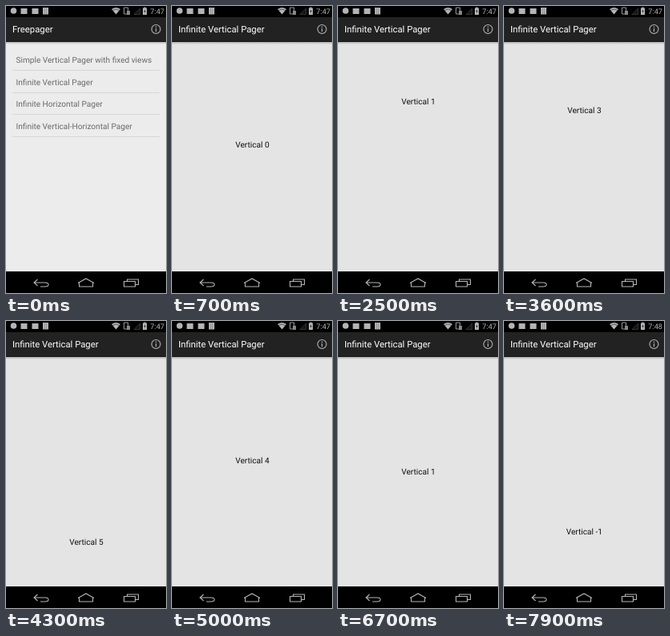
Recreate the animation shown at these times as an HTML page. Size 200x359 px, loop 8000 ms.

```html
<!DOCTYPE html>
<html lang="en">
<head>
<meta charset="utf-8">
<title>Vertical pager</title>
<style>
  html, body { margin: 0; width: 100%; height: 100%; overflow: hidden; background: #000; }
  svg { display: block; width: 100%; height: 100%; font-family: Roboto, sans-serif; text-rendering: geometricPrecision; }
  .title { font-size: 11.3px; fill: #fff; }
  .rows { font-size: 10.1px; fill: #6a6a6a; }
  .page { font-size: 10.1px; fill: #111; text-anchor: middle; }
  .line { fill: none; stroke: #b4b4b4; stroke-width: 1.1; }
</style>
</head>
<body>
<svg viewBox="0 0 200 359">
  <defs>
    <clipPath id="content"><rect y="45" width="200" height="287"/></clipPath>
    <linearGradient id="shadow" x2="0" y2="1">
      <stop stop-color="#000" stop-opacity=".24"/>
      <stop offset="1" stop-color="#000" stop-opacity="0"/>
    </linearGradient>
  </defs>
  <rect width="200" height="359"/>
  <rect y="14" width="200" height="31" fill="#222"/>

  <!-- Status bar -->
  <g fill="#b4b4b4">
    <circle cx="9.5" cy="6" r="3.8"/>
    <rect x="18.5" y="3" width="8" height="7"/>
    <rect x="32.5" y="3" width="8" height="7"/>
    <rect x="46" y="2" width="7" height="8.5"/>
    <path d="M48.300 2V10.500M50.700 2V10.500" stroke="#777" stroke-width=".5"/>
    <path d="M132 4Q137.500 0 143 4L137.500 10.500Z"/>
    <path d="M133 5.500Q137.500 2.500 142 5.500" fill="none" stroke="#333" stroke-width=".7"/>
    <path d="M147.500 2H152.500V10H147.500Z" fill="none" stroke="#999"/>
    <path d="M151 6H155V11H151Z" fill="#888"/>
    <path d="M160 10.500L167.500 3V10.500Z" fill="#151515" stroke="#444" stroke-width=".7"/>
    <path d="M171 2.500H172.500V1.500H174.500V2.500H176V11H171Z"/>
    <path d="M174 4L172.300 7H173.500L173 9.500L174.800 6H173.600Z" fill="#222"/>
    <text id="clock" x="198" y="9.700" font-size="9.2" text-anchor="end"></text>
  </g>

  <!-- List screen -->
  <rect y="45" width="200" height="287" fill="#ececec"/>
  <g id="list">
    <rect id="pressed" x="8" y="81" width="184" height="27" fill="#cacaca"/>
    <g class="rows" id="rows"></g>
    <text class="title" x="8" y="33">Freepager</text>
  </g>

  <!-- Pager screen -->
  <g id="pager">
    <rect y="45" width="200" height="287" fill="#e4e4e4"/>
    <text class="title" x="8" y="33">Infinite Vertical Pager</text>
    <g class="page" clip-path="url(#content)">
      <text id="upper" x="100.400"></text>
      <text id="lower" x="100.400"></text>
    </g>
  </g>

  <rect y="44" width="200" height="1" fill="#161616"/>
  <rect y="45" width="200" height="3" fill="url(#shadow)"/>
  <circle class="line" cx="187.500" cy="29" r="5.500"/>
  <path d="M187.500 25.500V27M187.500 28V32.200" class="line" stroke-width="1.300"/>

  <!-- Navigation bar -->
  <g class="line">
    <path d="M39.500 342L35 346L39.500 350M35 346H49Q53 346 53 348.500Q53 351 49 351H43"/>
    <path d="M90 346.500L100 341L110 346.500M91.500 346V351H108.500V346"/>
    <path d="M147.500 344.500H161.500V351H147.500ZM151.500 344V342H165.500V348.500H162"/>
  </g>
</svg>
<script>
const LOOP = 8000, STEP = 100, PAGE_HEIGHT = 288, REST_Y = 173;
const $ = id => document.getElementById(id);

const rows = ["Simple Vertical Pager with fixed views", "Infinite Vertical Pager",
  "Infinite Horizontal Pager", "Infinite Vertical-Horizontal Pager"];
$("rows").innerHTML = rows.map((label, i) => {
  const y = 71 + i * 27.5;
  return `<text x="12.5" y="${y}">${label}</text>
    <rect x="8" y="${Math.round(y + 9)}" width="184" height="1" fill="#d6d6d6"/>`;
}).join("");

// Start times of the swipes to the next and to the previous page
const forward = [1770, 2333, 2890, 3453, 3980];
const backward = [4430, 4992, 5530, 6085, 6610, 7135, 7680];

// Slow drag, quick release, soft settling: [ms, fraction of a page]
const swipeCurve = [[0, 0], [100, .06], [200, .25], [265, .455], [300, .57],
  [365, .805], [400, .87], [480, .97], [560, 1]];

function swipe(ms) {
  if (ms <= 0) return 0;
  const i = swipeCurve.findIndex(([time]) => time >= ms);
  if (i < 0) return 1;
  const [t0, p0] = swipeCurve[i - 1], [t1, p1] = swipeCurve[i];
  return p0 + (p1 - p0) * (ms - t0) / (t1 - t0);
}

const travel = (starts, t) => starts.reduce((sum, start) => sum + swipe(t - start), 0);

function placePage(node, number, offset, shift) {
  node.textContent = "Vertical " + number;
  node.setAttribute("y", REST_Y + 3.6 + (number - offset) * PAGE_HEIGHT + shift);
}

function draw(now) {
  const t = Math.floor(now % LOOP / STEP) * STEP;
  const x = Math.min(1, Math.max(0, (t - 400) / 300));
  const opened = 1 - (1 - x) ** 2;
  $("pressed").style.display = t >= 200 ? "" : "none";
  $("list").style.opacity = 1 - opened;
  $("pager").style.opacity = opened;
  $("clock").textContent = t < 7000 ? "7:47" : "7:48";

  const offset = travel(forward, t) - travel(backward, t);
  const first = Math.floor(offset + 1e-6);
  const shift = 36 * (1 - opened);
  placePage($("upper"), first, offset, shift);
  placePage($("lower"), first + 1, offset, shift);
}

const begin = performance.now();
function tick() {
  draw(performance.now() - begin);
  requestAnimationFrame(tick);
}
tick();
</script>
</body>
</html>
```
